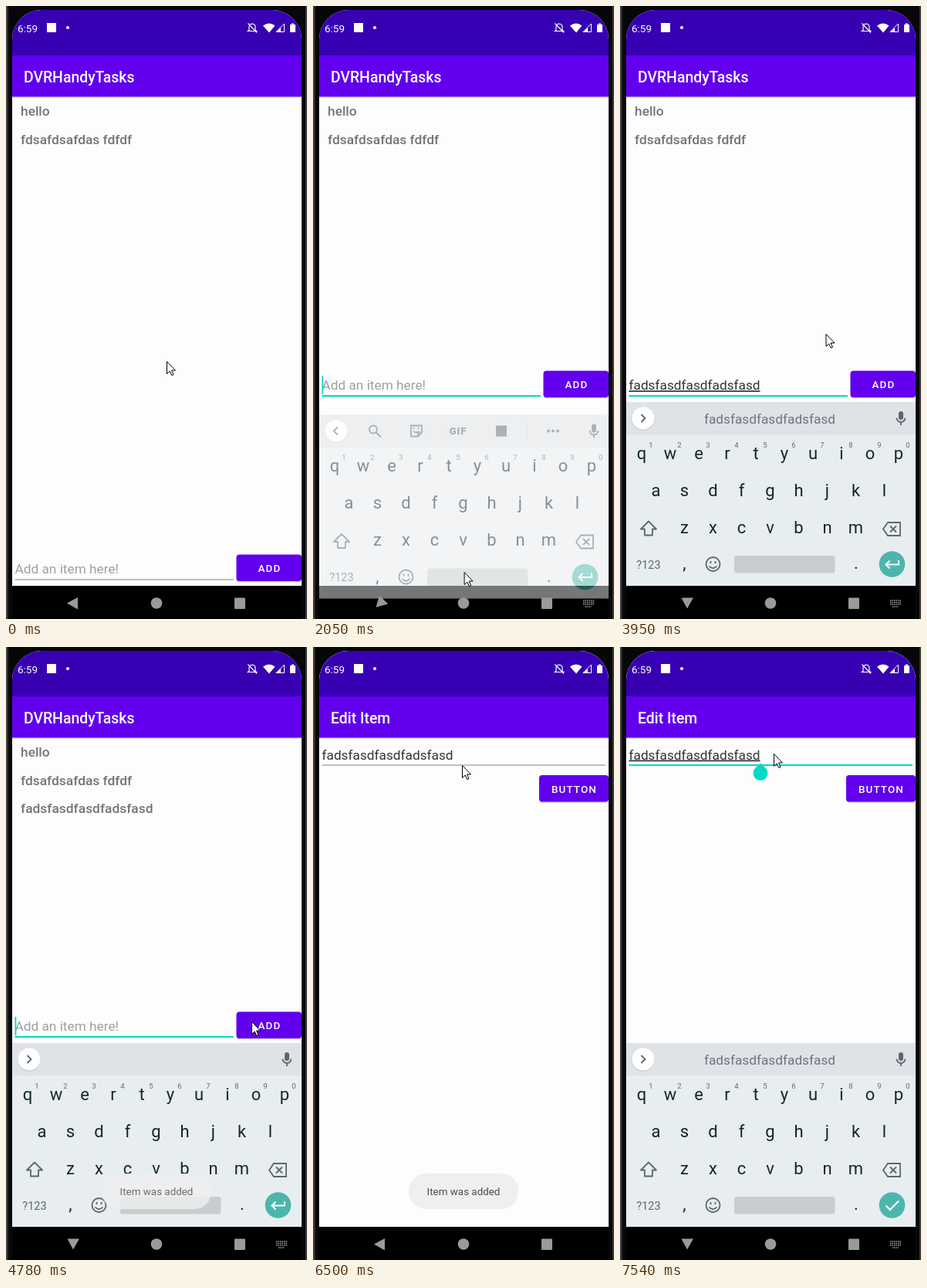
These frames come from a looping animation (390x794 px, 8 s). An HTML page:

```html
<!DOCTYPE html>
<html lang="en">
<head>
<meta charset="utf-8">
<title>Todo app demo</title>
<style>
  html, body { margin: 0; width: 100%; height: 100%; overflow: hidden; background: #000; }
  svg { display: block; width: 390px; height: 794px; font-family: Roboto, sans-serif; }
  .title { font-size: 19.4px; font-weight: 500; fill: #fff; }
  .item { font-size: 17.35px; font-weight: 500; fill: #757575; }
  .field { font-size: 17.25px; fill: #333; }
  .hint { fill: #a0a0a0; }
  .label { font-size: 13.4px; font-weight: 500; letter-spacing: 1.15px; fill: #fff; }
  .mid { text-anchor: middle; }
  .key { font-size: 22px; fill: #14262e; text-anchor: middle; }
  .digit { font-size: 9.5px; fill: #5f6b72; text-anchor: middle; }
  .ico { fill: none; stroke: #5c676d; stroke-width: 1.8; }
  .solid { fill: #5c676d; }
  .grey { fill: #6b757b; }
  .under { text-decoration: underline; text-decoration-thickness: 1px; }
</style>
</head>
<body>
<svg viewBox="0 0 390 794">
  <defs>
    <clipPath id="glass"><path d="M8 794V43A38 38 0 0 1 46 5H345A38 38 0 0 1 383 43V794Z"/></clipPath>
    <linearGradient id="edge">
      <stop offset="0" stop-color="#555"/><stop offset=".5" stop-color="#2b2b2b"/><stop offset="1" stop-color="#050505"/>
    </linearGradient>
    <g id="frame">
      <rect x="8" y="5" width="375" height="789" fill="#fdfdfd"/>
      <rect x="8" y="117" width="375" height="2" opacity=".12"/>
      <rect x="8" y="5" width="375" height="59" fill="#3700b3"/>
      <rect x="8" y="64" width="375" height="53.5" fill="#6200ee"/>
      <rect x="8" y="751" width="375" height="43"/>
    </g>
  </defs>

  <rect width="390" height="794" fill="#070707"/>
  <rect width="4" height="794" fill="url(#edge)"/>
  <rect x="388" width="2" height="794" fill="#3c3c3c"/>

  <g clip-path="url(#glass)">
    <g id="list">
      <use href="#frame"/>
      <text class="title" x="23" y="98.5">DVRHandyTasks</text>
      <text class="item" x="19" y="142">hello</text>
      <text class="item" x="19" y="178.5">fdsafdsafdas fdfdf</text>
      <text class="item" id="added" x="19" y="215">fadsfasdfasdfadsfasd</text>
      <g id="entry">
        <text class="field hint" id="hint" x="11.5" y="735">Add an item here!</text>
        <text class="field under" id="typed" x="11.5" y="735"></text>
        <rect id="line" x="11.5" width="283.5"/>
        <rect id="caret" y="717" width="1.8" height="24" fill="#03dac5"/>
        <rect x="298.5" y="711.5" width="84.5" height="35" rx="4" opacity=".15"/>
        <rect x="298.5" y="710.5" width="84.5" height="34.5" rx="4" fill="#6200ee"/>
        <text class="label mid" x="341.5" y="733">ADD</text>
      </g>
    </g>

    <g id="edit">
      <use href="#frame"/>
      <text class="title" x="23" y="98.5">Edit Item</text>
      <text class="field" id="value" x="11.5" y="145.500">fadsfasdfasdfadsfasd</text>
      <rect id="editLine" x="11.5" width="367.5"/>
      <rect x="293" y="167" width="90" height="35" rx="4" opacity=".15"/>
      <rect x="293" y="166" width="90" height="34.5" rx="4" fill="#6200ee"/>
      <text class="label mid" x="338.5" y="189">BUTTON</text>
      <path id="handle" fill="#03dac5" d="M182 150.5L189 157A9.5 9.5 0 1 1 175 157Z"/>
    </g>

    <g id="kb">
      <rect x="8" y="513" width="375" height="238" fill="#e8edf0"/>
      <rect x="8" y="513" width="375" height="42" fill="#dfe3e7"/>
      <circle cx="30" cy="535" r="14.8" opacity=".1"/>
      <circle cx="30" cy="534" r="14.5" fill="#fff"/>
      <g id="tools">
        <path class="ico" d="M32 529L27 534L32 539"/>
        <circle class="ico" cx="78" cy="532" r="5"/>
        <path class="ico" d="M81.5 535.5L88 542"/>
        <path class="ico" d="M127 527H141V536L136 541H127ZM141 536H136V541M130 534Q133.5 538 137 534M130.5 529.5V531.5M136.5 529.5V531.5"/>
        <text class="solid mid" x="188" y="538.5" font-size="13" font-weight="900" letter-spacing=".8">GIF</text>
        <rect class="solid" x="237" y="527" width="14" height="14"/>
        <rect x="276.5" y="523" width="1" height="21" fill="#c8cdd1"/>
        <path class="ico" d="M305 534h.01m6 0h.01m6 0h.01" stroke-linecap="round" style="stroke-width:3.8"/>
      </g>
      <g id="strip">
        <path class="ico" d="M27.5 529L32.5 534L27.5 539"/>
        <text class="field grey mid" id="guess" x="194" y="540.5"></text>
      </g>
      <rect class="solid" x="361" y="525" width="6" height="11" rx="3"/>
      <path class="ico" d="M358.5 533.5A5.5 5.5 0 0 0 369.5 533.5M364 539V543"/>
      <g id="keys"></g>
      <path class="ico" d="M37 667.5L47 677.5H42V685.5H32V677.5H27Z" stroke-linejoin="round"/>
      <path class="ico" d="M347 669H363V686H347L341 677.5ZM350 673.5L358 681.5M358 673.5L350 681.5"/>
      <text class="solid mid" x="37" y="728.5" font-size="14.5">?123</text>
      <circle class="ico" cx="120.5" cy="723" r="9"/>
      <path class="ico" d="M115.5 725.5Q120.5 731 125.5 725.5M117.5 719V722M123.5 719V722"/>
      <rect x="148" y="712" width="130.5" height="22.5" rx="3" fill="#c8cdd0"/>
      <circle cx="352.5" cy="723" r="16.8" fill="#4db6ac"/>
      <g fill="none" stroke="#fff" stroke-width="2">
        <path id="enter" d="M361 718V723.5H344.5M349.5 718.5L344.5 723.5L349.5 728.5"/>
        <path id="check" d="M344.5 723.5L350 729L361 717.5"/>
      </g>
    </g>

    <g id="toast">
      <rect x="124" y="682" width="142" height="46" rx="22" fill="#efefef"/>
      <text class="mid" x="195" y="710" font-size="13.4" fill="#4c4c4c">Item was added</text>
    </g>

    <g fill="#9a9a9a">
      <path id="back" d="M79 773.5L93 766V781.5Z"/>
      <circle cx="195" cy="773.5" r="7.3"/>
      <rect x="296" y="766.5" width="14" height="14.5" rx="1"/>
      <path id="dots" fill="none" stroke="#9a9a9a" stroke-width="1.6" stroke-dasharray="1.6 .9"
        d="M350 770H364.5M350 772.5H364.5M350 775H364.5M353 778H361"/>
    </g>
    <g fill="#fff">
      <text x="15" y="33.500" font-size="13.5">6:59</text>
      <rect x="53" y="22" width="12" height="12"/>
      <circle cx="80" cy="28" r="2.1"/>
      <path d="M315 31.5V27Q315 23.5 319 23Q323 23.5 323 27V31.5L324.5 32.5H313.5ZM313.5 22.5L325 34.5" fill="none" stroke="#fff" stroke-width="1.2"/>
      <path d="M333 25.500Q341 19.500 348.500 25.500L341 34.500Z"/>
      <path d="M350 33.500L360.500 23V33.500Z" fill="none" stroke="#fff"/>
      <path d="M350 34L356 28V34Z"/>
      <path d="M368 24H370V22.500H373V24H375V34H368Z"/>
    </g>
  </g>
  <path id="pointer" fill="#fff" stroke="#000" stroke-linejoin="round" d="M.5 .5V16.5L4.2 13L6.800 18.500L9 17.500L6.600 12H11.500Z"/>
</svg>

<script>
const $ = id => document.getElementById(id);
const LOOP = 8000, STEP = 135, WORD = "fadsfasdfasdfadsfasd";
const FOCUS = 1760, TYPE = 3110, ADD = 4372, EDIT = 5990, REFOCUS = 7150;

// Pointer strokes: begin, end, x, y
const strokes = [
  [150, 418, 120, 237], [553, 956, 352, 774], [1090, 1360, 204, 735],
  [1910, 2430, 183, 730], [TYPE, 3670, 215, 364], [3810, 4236, 318, 485],
  [4900, 5700, 146, 214], [6110, 6500, 193, 153], [6630, 7020, 199, 138]
];

// Progress from a to b in even screen updates: the first at a, complete at b.
function phase(t, a, b) {
  if (t < a) return 0;
  const gaps = Math.round((b - a) / STEP);
  return Math.min(1, (Math.floor((t - a) / (b - a) * gaps + .01) + 1) / (gaps + 1));
}

const set = (id, attrs) => { for (const k in attrs) $(id).setAttribute(k, attrs[k]); };
const show = (id, on) => { $(id).style.display = on ? "" : "none"; };
const write = (id, s) => { $(id).textContent = s; };
const zoom = (s, drop = 0) =>
  `translate(195.5 ${397 + drop}) scale(${s}) translate(-195.5 -397)`;
const underline = (id, y, on) =>
  set(id, { y: on ? y - .5 : y, height: on ? 2 : 1, fill: on ? "#03dac5" : "#858585" });

function buildKeys() {
  const text = (c, x, y, s) => `<text class="${c}" x="${x}" y="${y}">${s}</text>`;
  const row = (c, s, x, y) => [...s].map((k, i) => text(c, x + 37 * i, y, k)).join("");
  $("keys").innerHTML = row("digit", "1234567890", 40, 571.5) +
    ["qwertyuiop", "asdfghjkl", "zxcvbnm"].map((s, i) =>
      row("key", s, [28, 46.5, 83.5][i], 586.5 + 48 * i)).join("") +
    text("key", 83.5, 729, ",") + text("key", 306, 729, ".");
}

function movePointer(t) {
  let x = 208, y = 460;
  for (const [a, b, tx, ty] of strokes) {
    const p = phase(t, a, b);
    x += (tx - x) * p;
    y += (ty - y) * p;
  }
  set("pointer", { transform: `translate(${x} ${y})` });
}

function draw(t) {
  const editing = t >= EDIT, refocus = t >= REFOCUS, added = t >= ADD;
  const leave = refocus ? 0 : phase(t, EDIT, 6240);
  const rise = refocus ? phase(t, REFOCUS, 7540) : phase(t, 1910, 2260);
  movePointer(t);

  // The list grows away while the edit screen settles
  set("list", { transform: zoom(1 + .12 * leave) });
  set("edit", { transform: zoom(.953 + .047 * (refocus ? 1 : leave)) });
  show("edit", editing);

  const n = added ? 0 : Math.round(WORD.length * phase(t, TYPE, 3950));
  write("typed", WORD.slice(0, n));
  show("hint", !n);
  show("added", added);
  set("entry", { transform: `translate(0 ${t >= 2050 ? -238 : 0})` });
  underline("line", 742.5, t >= FOCUS);
  set("caret", { x: n ? 12 + $("typed").getComputedTextLength() : 11.5 });
  show("caret", t >= FOCUS && Math.floor((t - FOCUS) / 670) % 2 === 0);

  underline("editLine", 152.5, refocus);
  $("value").classList.toggle("under", refocus);
  show("handle", refocus);

  set("kb", {
    opacity: rise - leave,
    transform: zoom(1 + .12 * leave, 33 * (1 - rise + leave))
  });
  const strip = (t >= TYPE && t < 5020) || refocus;
  show("tools", !strip);
  show("strip", strip);
  write("guess", WORD.slice(0, refocus ? WORD.length : n));
  show("enter", !refocus);
  show("check", refocus);

  // The message sits under the keyboard while it leaves
  if (editing) $("kb").before($("toast")); else $("kb").after($("toast"));
  set("toast", { opacity: phase(t, ADD, 4900) - phase(t, 6760, 7020) });

  const turn = leave ? 135 * (1 - leave) : -90 * rise;
  set("back", { transform: `rotate(${turn} 86.5 773)` });
  show("dots", (t >= FOCUS && !editing) || refocus);
}

buildKeys();
const start = performance.now();
function loop() {
  draw((performance.now() - start) % LOOP);
  requestAnimationFrame(loop);
}
loop();
</script>
</body>
</html>
```
